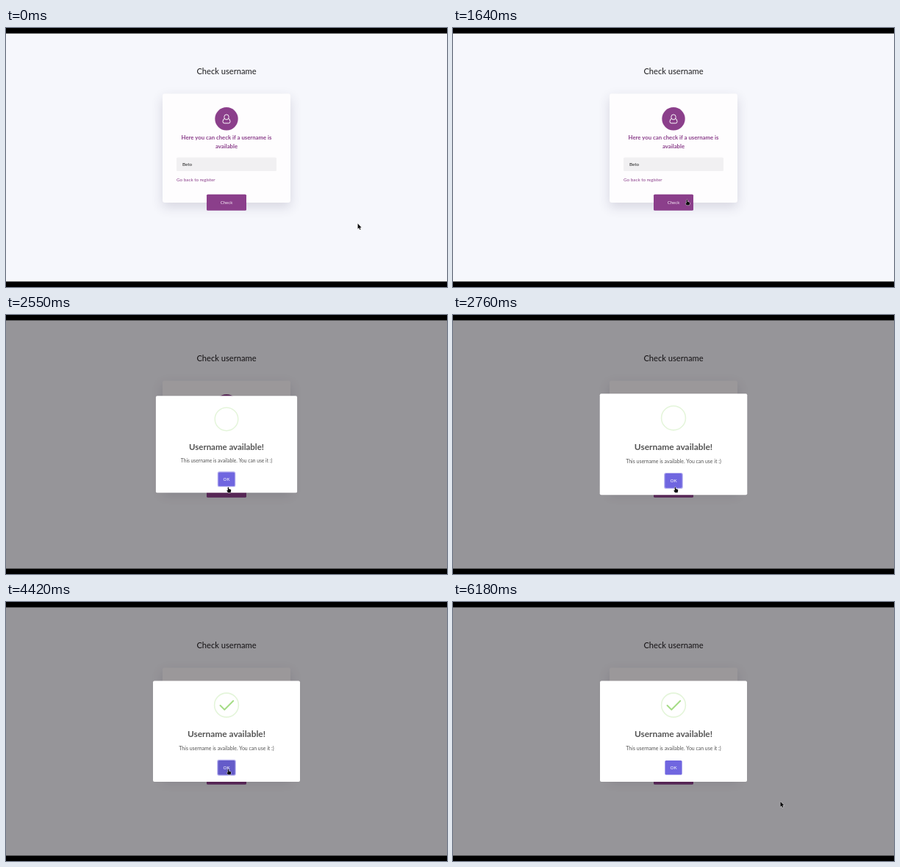
These frames come from a looping animation (600x353 px, 6580 ms). An HTML page with a canvas:

```html
<!DOCTYPE html>
<html lang="en">
<head>
<meta charset="utf-8">
<title>Check username</title>
<style>
html, body { margin: 0; width: 100%; height: 100%; overflow: hidden; background: #000; }
canvas { display: block; width: 600px; height: 353px; }
</style>
</head>
<body>
<canvas id="stage" width="600" height="353"></canvas>
<script>
const ctx = document.getElementById('stage').getContext('2d');
const LOOP = 6580, OPEN = 2450, POP = 2470, BLUR = 5150;
const PURPLE = '#8b3f8b', GREEN = '#a5dc86', GREY = '#545454';

const clamp = v => Math.max(0, Math.min(1, v));
const span = (t, start, length) => clamp((t - start) / length);
const easeOut = u => 1 - (1 - u) ** 1.9;
const easeInOut = u => u * u * (3 - 2 * u);

// Pointer moves: start, duration, end point
const MOVES = [
  [0, 180, 535, 231],
  [620, 1350, 302, 235.6],
  [4100, 310, 302, 229],
  [5500, 680, 445.4, 272]
];

function pointer(t) {
  let x = 478, y = 267;
  for (const [start, length, tx, ty] of MOVES) {
    const k = easeOut(span(t, start, length));
    x += (tx - x) * k;
    y += (ty - y) * k;
  }
  return { x, y };
}

function box(x, y, w, h, r, fill) {
  ctx.fillStyle = fill;
  ctx.beginPath();
  ctx.roundRect(x, y, w, h, r);
  ctx.fill();
}

function circle(x, y, r) {
  ctx.beginPath();
  ctx.arc(x, y, r, 0, 2 * Math.PI);
}

function text(str, x, y, size, color, weight = 400, align = 'center') {
  ctx.font = `${weight} ${size}px Lato, sans-serif`;
  ctx.textAlign = align;
  ctx.fillStyle = color;
  ctx.fillText(str, x, y);
}

function userIcon() {
  ctx.fillStyle = PURPLE;
  circle(300, 123.8, 15.7);
  ctx.fill();
  ctx.strokeStyle = '#fff';
  ctx.lineWidth = .95;
  ctx.beginPath();
  ctx.roundRect(295, 123.2, 10, 6.6, [4, 4, 2.2, 2.2]);
  ctx.stroke();
  ctx.beginPath();
  ctx.ellipse(300, 121.4, 3.2, 3.5, 0, 0, 2 * Math.PI);
  ctx.fill();
  ctx.stroke();
}

function page() {
  box(0, 7.4, 600, 338.2, 0, '#f6f7fc');
  text('Check username', 300, 63.2, 11.15, '#1c1c1e');
  ctx.save();
  ctx.shadowColor = 'rgba(50,45,80,.16)';
  ctx.shadowBlur = 16;
  ctx.shadowOffsetY = 6;
  box(213, 89.5, 174, 148.5, 3, '#fefdfe');
  ctx.restore();
  userIcon();
  text('Here you can check if a username is', 300, 152.2, 7.75, PURPLE, 700);
  text('available', 300, 163.8, 7.75, PURPLE, 700);
  box(232, 176.5, 136, 18.5, 1.5, '#f1f0f2');
  text('Beto', 240, 188.2, 6.3, '#222', 400, 'left');
  text('Go back to register', 232, 209.2, 6.3, PURPLE, 400, 'left');
  box(273, 226.7, 54, 22.1, 1.6, PURPLE);
  text('Check', 300, 240, 6.1, '#f6eaf6');
}

function successIcon(drawn) {
  ctx.strokeStyle = 'rgba(165,220,134,.3)';
  ctx.lineWidth = 1.56;
  circle(300, 140.5, 16.4);
  ctx.stroke();
  if (drawn <= 0) return;
  ctx.save();
  ctx.strokeStyle = GREEN;
  ctx.lineWidth = 1.95;
  ctx.lineCap = ctx.lineJoin = 'round';
  ctx.setLineDash([26 * drawn, 60]);
  ctx.beginPath();
  ctx.moveTo(291.5, 141);
  ctx.lineTo(297.3, 146.7);
  ctx.lineTo(309.2, 134.8);
  ctx.stroke();
  ctx.restore();
}

function okButton(t, hover) {
  const focus = 1 - span(t, BLUR, 210);
  box(287.2, 214.8, 25.6, 21.9, 2.7, `rgba(112,102,224,${.5 * focus})`);
  box(288.4, 216, 23.2, 19.5, 1.6, '#7066e0');
  if (hover) box(288.4, 216, 23.2, 19.5, 1.6, `rgba(0,0,0,${.1 * focus})`);
  text('OK', 300, 228, 6.25, '#fff');
}

function modal(t, hover) {
  box(0, 7.4, 600, 338.2, 0, `rgba(5,0,4,${.4 * easeInOut(span(t, 2428, 100))})`);
  // Springs open with a damped swing around full size
  const s = Math.max(0, t - POP);
  const zoom = 1 - .3 * Math.exp(-s / 90) * Math.cos(s / 65);
  ctx.save();
  ctx.translate(300, 176.25);
  ctx.scale(zoom, zoom);
  ctx.translate(-300, -176.25);
  box(200, 107.5, 200, 137.5, 2, '#fff');
  successIcon(easeInOut(span(t, POP + 400, 350)));
  text('Username available!', 300, 184.3, 11.92, GREY, 700);
  text('This username is available. You can use it :)', 300, 202.3, 6.95, GREY);
  okButton(t, hover);
  ctx.restore();
}

const ARROW = new Path2D('M0 0V7.2L1.7 5.7L2.8 8.3L4 7.8L2.9 5.3H5Z');
const HAND = new Path2D('M-.3 -.7Q.4 -1.7 1.1 -.7V1.5L3.6 2.2Q4.4 2.5 4.2 3.5L3.6 6.3H0L-1.6 4Q-1.8 2.9 -.3 3.5Z');

function cursor(x, y, shape) {
  ctx.save();
  ctx.translate(x, y);
  ctx.lineJoin = 'round';
  ctx.lineWidth = 1;
  ctx.strokeStyle = 'rgba(255,255,255,.8)';
  ctx.stroke(shape);
  ctx.fillStyle = '#0b0b0d';
  ctx.fill(shape);
  ctx.restore();
}

function draw(t) {
  const { x, y } = pointer(t);
  const open = t >= OPEN;
  const inside = (l, r, top, bottom) => x > l && x < r && y > top && y < bottom;
  const link = open ? t > 2515 && inside(288, 312, 215, 236) : inside(273, 327, 226, 249);
  ctx.fillStyle = '#000';
  ctx.fillRect(0, 0, 600, 353);
  page();
  if (open) modal(t, link && y < 235);
  cursor(x, y, link ? HAND : ARROW);
}

function frame(now) {
  draw(now % LOOP);
  requestAnimationFrame(frame);
}
requestAnimationFrame(frame);
</script>
</body>
</html>
```
